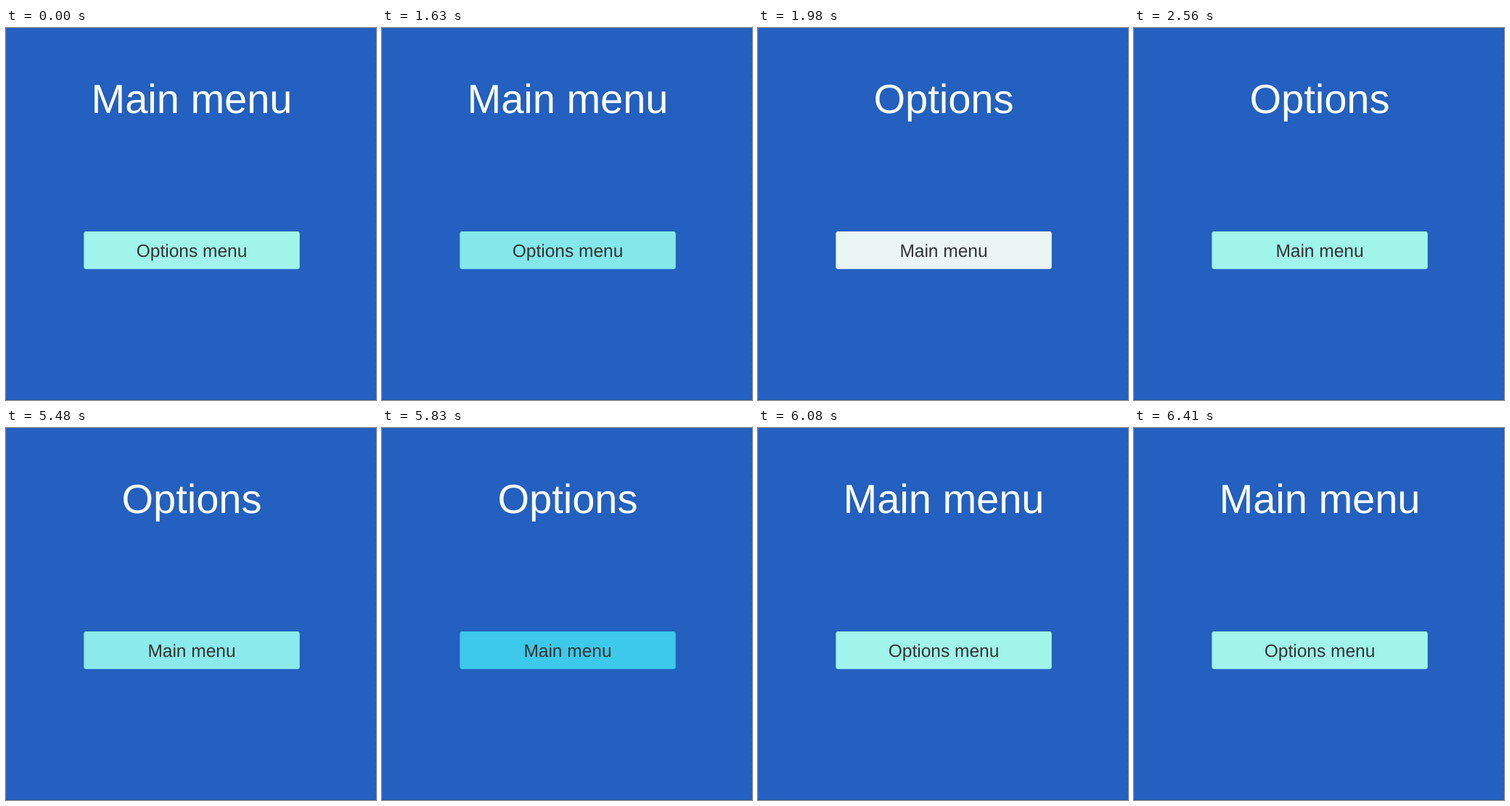
An HTML page for the animation above (9.04 s loop, 510 by 512 pixels).

```html
<!DOCTYPE html>
<html lang="en">
<head>
<meta charset="utf-8">
<title>Menu switch</title>
<style>
  html, body { margin: 0; width: 100%; height: 100%; overflow: hidden; background: #2360bf; }
  svg { display: block; width: 100%; height: 100%; }
  text { font-family: "Liberation Sans", Arial, sans-serif; text-anchor: middle; text-rendering: geometricPrecision; }
</style>
</head>
<body>
<svg viewBox="0 0 510 512">
  <rect width="510" height="512" fill="#2360bf"/>
  <path d="M0 511.5H510" stroke="#2058ae"/>
  <path d="M509.5 0V512" stroke="#215bb6" stroke-dasharray="4 4"/>
  <text id="title" x="256" y="116.8" font-size="56" fill="#fff"></text>
  <rect id="button" x="107.3" y="280" width="297.5" height="51.8" rx="3.2"/>
  <text id="label" x="256" y="315" font-size="24.5" fill="#323232"></text>
</svg>
<script>
const LOOP = 9040;
const NORMAL = [245, 245, 245], HOVER = [160, 244, 234], PRESSED = [60, 201, 234];
const MAIN = ["Main menu", "Options menu"], OPTIONS = ["Options", "Main menu"];

// A colour fade shown in 30 ms steps, each adding 30% of the way
const fade = (start, first, from, to, menu) =>
  [0, 1, 2, 3].map(i => ({ at: start + i * 30, mix: Math.min(1, first + i * 0.3), from, to, menu }));

const steps = [
  { at: 0, mix: 1, from: HOVER, to: HOVER, menu: MAIN },
  ...fade(1630, 0.28, HOVER, PRESSED, MAIN),
  ...fade(1980, 0.13, NORMAL, HOVER, OPTIONS),
  ...fade(5480, 0.21, HOVER, PRESSED, OPTIONS),
  { at: 5860, mix: 0, from: NORMAL, to: HOVER, menu: MAIN },
  ...fade(5960, 0.13, NORMAL, HOVER, MAIN)
];

const [title, button, label] = ["title", "button", "label"].map(id => document.getElementById(id));
let shown = null;

function show(step) {
  if (step === shown) return;
  shown = step;
  const { mix, from, to, menu } = step;
  [title.textContent, label.textContent] = menu;
  button.setAttribute("fill", `rgb(${from.map((c, i) => Math.round(c + (to[i] - c) * mix))})`);
}

const start = performance.now();
function draw(now) {
  const t = Math.max(0, now - start) % LOOP;
  show(steps.filter(s => s.at <= t).pop());
  requestAnimationFrame(draw);
}
draw(start);
</script>
</body>
</html>
```
